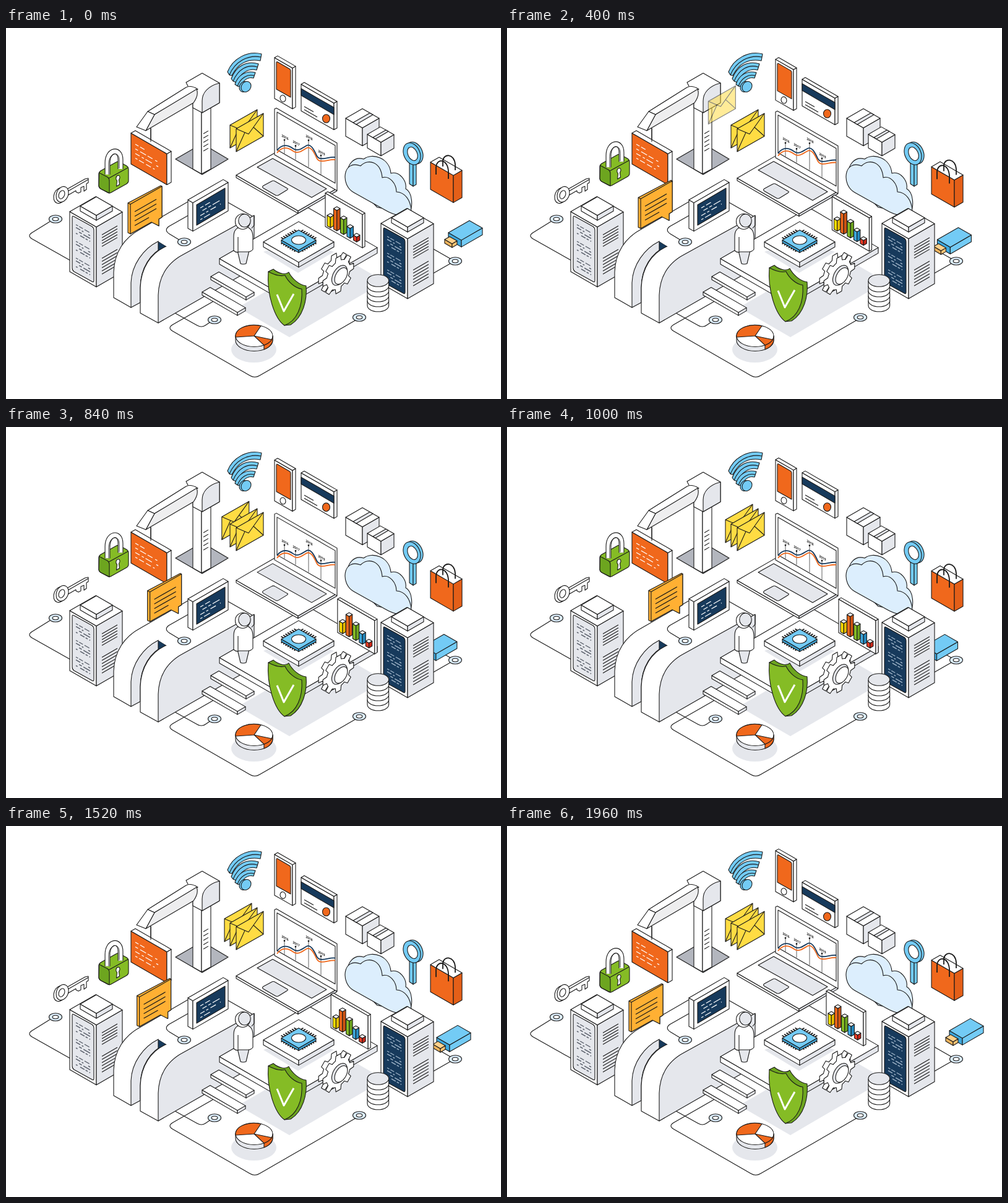
These frames come from a looping animation (800 by 600 pixels, 2000 ms). An HTML page:

```html
<!DOCTYPE html>
<html lang="en">
<head>
<meta charset="utf-8">
<title>Isometric technology scene</title>
<style>
html, body { margin: 0; width: 100%; height: 100%; overflow: hidden; background: #fff; }
svg { display: block; width: 800px; height: 600px; stroke: #1a1a1a; stroke-width: 1.1; stroke-linejoin: round; }
text { font: bold 5.5px "Open Sans", sans-serif; text-anchor: middle; fill: #1a1a1a; stroke: none; }
</style>
</head>
<body>
<svg id="stage" viewBox="0 0 800 600"></svg>
<script>
const white = '#fff', gray = '#e5e7ec', orange = '#f0681c', amber = '#ffb033', yellow = '#ffdc43',
  blue = '#73cbf5', deepBlue = '#3ea8dd', navy = '#173a5c', green = '#85bc25', darkGreen = '#6da51f', pale = '#dceefd';
const SLOPE = 0.577;

const path = (fill, d, extra = '') => `<path fill="${fill}" d="${d}" ${extra}/>`;
const line = (d, extra) => path('none', d, extra);
const flat = (fill, d) => path(fill, d, 'stroke="none"');
const oval = (fill, x, y, rx, ry, turn = 0, extra = '') =>
  `<ellipse fill="${fill}" cx="${x}" cy="${y}" rx="${rx}" ry="${ry}" transform="rotate(${turn} ${x} ${y})" ${extra}/>`;
const group = (id, ...parts) => `<g id="${id}">${parts.join('')}</g>`;

// Box from the left corner of its top: a runs down-right, b up-right, h is the height.
function prism(x, y, a, b, h, top = white, left = white, right = gray) {
  const fy = y + a * SLOPE, ry = fy - b * SLOPE, by = y - b * SLOPE;
  return path(left, `M${x},${y}L${x + a},${fy}v${h}L${x},${y + h}Z`)
    + path(right, `M${x + a},${fy}L${x + a + b},${ry}v${h}L${x + a},${fy + h}Z`)
    + path(top, `M${x},${y}L${x + a},${fy}L${x + a + b},${ry}L${x + b},${by}Z`);
}

// Parallel slanted strokes; each dash pattern makes one row.
const rows = (x, y, dx, gap, dir, color, dashes, width = 1.1) => dashes.map((dash, i) =>
  line(`M${x},${y + i * gap}l${dx},${dx * SLOPE * dir}`,
    `stroke="${color}" stroke-width="${width}" stroke-dasharray="${dash}"`)).join('');
const solid = n => Array(n).fill('none');

const node = (x, y) => oval(pale, x, y, 10.5, 6.3) + oval(white, x, y, 4.8, 2.7);

function server(dx, dy, panel, ink) {
  const code = ['4 2 7 3 9', '8 3 3 9', '0 6 5 3 10', '3 5 8 2 4'];
  const text = [0, 27, 54].map(s => rows(113, 318 + s, 23, 4.6, 1, ink, code, 1.4)).join('');
  return `<g transform="translate(${dx} ${dy})">` + prism(103, 297, 43, 42, 97)
    + path(panel, 'M107,306Q107,303 110,305L139,321Q142,323 142,327V408Q142,412 139,410L110,394Q107,392 107,388Z')
    + text + rows(155, 334.5, 25, 4.7, -1, '#1a1a1a', solid(5)) + rows(155, 372.5, 25, 5.1, -1, '#1a1a1a', solid(6))
    + prism(120, 288, 26, 26, 8) + '</g>';
}

const envelope = (x, y, id = '') => `<g id="${id}" transform="translate(${x} ${y})">`
  + path(yellow, 'M0,0L44,-25V12L0,37Z') + line('M0,0L20,8.5L44,-25M0,37L14,6M44,12L28,-2.5') + '</g>';

const ground = line('M71,313L42,331Q34,336 42,341L104,376')
  + line('M337,441L269,480Q261,485 269,490L394,562Q402,567 410,562L566,472')
  + line('M273,461L309,481Q316,485 322,481L331,475')
  + line('M690,357L718,373M718,381L690,397');

const robotArm = path('#b3b6be', 'M274,212L317,187L359,212L317,237Z')
  + path(white, 'M302,120V228L316,236V130Z') + path(white, 'M316,130V236L331,228V120Z')
  + rows(319, 171, 8, 7, -1, '#1a1a1a', solid(5))
  + path(white, 'M291,88L317,73L345,89V121L317,137L302,129V110Z')
  + path(gray, 'M317,137V118C317,105 326,94 345,89V121Z')
  + path(white, 'M229,135L291,96Q299,92 310,99L240,140Z')
  + path('#eeeeef', 'M240,140L308,99Q312,108 303,121L226,166Z')
  + path(white, 'M229,135L240,140L226,166L211,160Z') + line('M234,162V187');

const orangePanel = prism(202, 170, 58, 7, 50, white, orange, white) + line('M234,162V184')
  + rows(209, 188, 37, 7.5, 1, white, ['6 3 8 40', '5 4 11 3 9', '8 4 4 3 12', '4 3 9 4 9'], 1.3);

const wifi = path(blue, 'M358,71C366,50 390,36 413,42L411,53C390,49 374,58 365,77L361,76Z')
  + line('M361,76C370,54 391,43 412,47')
  + path(blue, 'M364,82C371,62 389,52 408,58L405,68C392,65 380,72 372,88L367,86Z') + line('M367,86C375,67 390,58 406,63')
  + path(blue, 'M370,91C375,76 388,68 403,72L400,81C392,79 384,83 379,95L374,94Z') + line('M374,94C379,81 390,74 401,77')
  + oval(blue, 385, 95, 7.5, 9, 35) + oval(blue, 388, 95, 7.5, 9, 35);

const phone = group('phone', prism(434, 40, 29, 5, 66, white, white, white),
  path(orange, 'M437,48Q437,46 439,47L458,58Q460,59 460,61V104L437,91Z'), oval(white, 447.5, 106, 4.4, 5.5, -15));

const card = group('card', prism(477, 91, 53, 5, 43, white, white, white),
  path(navy, 'M477,98L530,128.6V140L477,109Z'), line('M482,127L497,135.5M482,132L503,144'),
  oval(orange, 517.5, 146.5, 6, 6.8));

const boxes = prism(549, 146, 27, 27, 29) + path(gray, 'M561,153L588,137.4L593,140.3L566,156Z')
  + prism(584, 172, 22, 21, 22) + path(gray, 'M593,177L614,165L618,167.3L597,179.5Z');

const years = [[450, 181, 203], [468, 190.5, 213], [489, 181.5, 225], [509, 206, 237]];
const wave = 'M438,198C446,187 456,189 464,195S480,193 486,190S497,195 502,206S522,207 532,209';
const laptop = group('laptop', prism(372, 238, 100, 62.5, 4),
  path(gray, 'M406,225L431,211L518,260L494,274Z'),
  path(gray, 'M416,255L429,248Q432,246 435,248L454,259Q457,260 454,262L441,270Q438,272 435,270L416,259Q413,257 416,255Z'),
  path(white, 'M434,131L437,129.5L535,186V263L434,205Z'), path(white, 'M438,136L532,190V251L438,197Z'),
  ...years.map(([x, top, end]) => line(`M${x},${top}V${end}`, 'stroke-width=".7"')),
  line(wave, `stroke="${orange}" stroke-width="1.8" transform="translate(0 4)"`),
  line(wave, `stroke="${navy}" stroke-width="1.8"`),
  ...years.map(([x, top], i) => oval('#1a1a1a', x, top, .8, 1)
    + `<text transform="matrix(.866 .5 0 1 ${x + 1} ${top - 2.5})">${2016 + i}</text>`));

const cloud = path(pale, 'M552,240C550,220 563,207 578,212C592,201 620,210 622,235C636,231 648,247 646,260C657,266 658,288 652,300L600,290Z')
  + path(pale, 'M562,266C540,254 544,212 573,223C586,210 606,217 608,242C620,238 631,252 631,265C645,266 654,278 655,296L640,304Q625,302 612,294Z');

const lens = path(blue, 'M652,218L658,220V256L652,252Z') + path(blue, 'M658,220L663,218V253L658,256Z')
  + oval(blue, 660, 202, 13, 18.5, -24) + oval(blue, 656, 203.5, 13, 18.5, -24) + oval(white, 657, 203.5, 7.5, 11.5, -24);

const bag = group('bag', prism(686, 217, 37, 14, 44, white, orange, '#e45f18'),
  line('M706,224V215C707,202 725,203 726,221V230M695,237V225C696,210 714,211 715,232V244', 'stroke-width="1.8"'));

const usb = group('usb', prism(715, 331, 21, 34, 11, blue, deepBlue, blue),
  prism(709, 342, 12, 8, 6, '#ffd08a', '#efb45d', '#ffc474'));

const key = path(white, 'M98,261L128,244L133,243V250L130,252V261L126,264V256L121,258V265L117,267L113,265V263L101,270Z')
  + line('M100,264L133,245') + oval(white, 87, 271, 9.5, 13, 22) + oval(white, 91, 269, 9.5, 13, 22) + oval(white, 90, 269.5, 4.5, 7, 22);

const shackle = 'M164,239V220C164,198 185,195 185,215V230';
const lock = group('lock',
  path(green, 'M150,238Q150,235 153,233L178,219Q181,217 184,219L195,225Q198,227 198,230V249Q198,252 195,254L170,268Q167,270 164,268L153,262Q150,260 150,257Z'),
  path(darkGreen, 'M150.5,236L164,243Q167,245 167,249V269L153,262Q150,260 150,257Z'), line('M166,245L197,228'),
  line(shackle, 'stroke-width="9"'), line(shackle, 'stroke="#fff" stroke-width="6.8"'),
  line('M166,239V221C167,203 183,200 183,216V229', 'stroke-width=".9"'),
  path(white, 'M178,247C177,240 184,238 184,244L182.5,248L183.5,255L178.5,258L179.5,249Z'));

const arch = path(white, 'M174,436V395C175,362 192,339 216,326L325,263L401,306L260,372L202,452Z')
  + path(gray, 'M202,452V412C203,383 222,357 246,345L259,353C233,362 217,390 217,420V444Z')
  + path(navy, 'M246,345L259,353L246,363Z')
  + path(white, 'M217,461V420C218,388 234,364 259,353L330,300L401,306L290,368L246,477Z')
  + flat(white, 'M259,353L246,345L325,290L400,306L290,368Z')
  + path(gray, 'M246,477V432C247,400 262,379 287,366L401,303V388Z')
  + line('M279,342L264,333Q255,327 263,321L300,300');

const screen = prism(294, 278, 8, 57, 46, white, white, white) + path(navy, 'M308,286L354,259V292L308,319Z')
  + rows(314, 291, 33, 6.3, -1, white, ['6 3 9 60', '0 4 8 3 5 3 9', '8 3 4 4 10', '4 3 11 40'], 1.2);

const bubble = group('bubble', path(amber, 'M197,283L250,255L252,256V306L247,309V320L235,313L201,333L197,331Z'),
  path(amber, 'M201,285L252,256V306L247,309V320L235,314L201,333Z'), line('M197,283L201,285'),
  line('M208,297L243,277M208,304.5L243,284.5M208,312L243,292M208,319.5L231,306.5', 'stroke-width="1.3"'));

const platform = flat(gray, 'M375,452L458,500L612,410L560,380L472,396Z') + prism(345, 373, 112, 143, 9);

let pins = '';
for (let i = 1; i < 8; i++) {
  const s = i * 3.5, d = s * SLOPE;
  pins += `M${445 + s},${345 + d}l-4,2.3M${473 + s},${361 - d}l4,2.3M${445 + s},${343 - d}l-4,-2.3M${473 + s},${327 + d}l4,-2.3`;
}
const chip = flat(gray, 'M416,362L472,396L530,362L472,340Z') + prism(416, 346, 57, 57, 8) + line(pins, 'stroke-width="1.8"')
  + prism(445, 343, 28, 28, 4, blue, deepBlue, deepBlue) + oval(white, 473, 343, 11.5, 7);

const bars = [[519, 303, 17, '#ffdd00', '#e8bd00'], [529.5, 292, 33, orange, '#cf5412'], [540.5, 307, 24, green, darkGreen],
  [551, 321, 16, deepBlue, '#258ac0'], [561.5, 335, 8, '#ee3b24', '#c92718']];
const chart = group('chart', prism(516, 267, 60, 4, 54, white, white, white),
  ...bars.map(([x, y, h, front, side]) => prism(x, y, 5.2, 5.2, h, white, front, side)));

const person = path(gray, 'M374,360H393L388,381Q383,383 379,381Z')
  + path(white, 'M368,360V337C368,326 374,321 385,321C396,322 399,330 399,338V358Q396,362 391,362H377Q372,364 368,360Z')
  + line('M375,362V338M397,324L401,319V303')
  + oval(white, 382.5, 313, 12, 12.5) + oval(gray, 385.5, 311.5, 9.8, 10.5);

const stairs = prism(331, 402, 57, 13, 5) + prism(317, 427, 57, 13, 5);

// Closed shape in the plane facing right, from [angle, radius] pairs around a centre.
function wheel(fill, cx, cy, points) {
  const spots = points.map(([a, r]) => {
    const x = Math.cos(a) * r * .866;
    return `${(cx + x).toFixed(1)},${(cy + Math.sin(a) * r - x * SLOPE).toFixed(1)}`;
  });
  return path(fill, `M${spots.join('L')}Z`);
}
const TEETH = 8, STEP = Math.PI * 2 / TEETH;
const cog = Array.from({ length: TEETH }, (_, i) =>
  [[-.32, 22], [-.2, 29], [.2, 29], [.32, 22], [.5, 22]].map(([part, r]) => [(i + part) * STEP, r])).flat();
const ring = r => Array.from({ length: 40 }, (_, i) => [i * Math.PI / 20, r]);
const gear = wheel(white, 530, 395, cog) + wheel(white, 537, 399, cog)
  + wheel(gray, 539, 400, ring(14.5)) + wheel(white, 541.5, 401, ring(12));

const shield = group('shield',
  path(darkGreen, 'M424,394L432,390C440,397 452,400 457,395C462,405 474,416 485,417C487,440 480,468 460,480L450,481Z'),
  path(green, 'M424,394C433,399 443,402 451,400C456,411 468,421 478,422C480,450 470,474 450,481C434,470 421,430 424,394Z'),
  line('M438,431L449,458L465,430', 'stroke="#fff" stroke-width="3"'));

let coins = '';
for (let y = 449; y > 410; y -= 8) coins += path(white, `M584,${y - 8}V${y}A17.3,9.8 0 0 0 618.6,${y}V${y - 8}`);
coins += oval(gray, 601.3, 408.5, 17.3, 9.8);

const pie = oval(gray, 400.5, 520, 36.5, 21, 0, 'stroke="none"')
  + path(gray, 'M371,498V505A30,17.5 0 0 0 431,505V498Z')
  + path(orange, 'M417,513V520Q430,515 431,505V498Z') + oval(white, 401, 498, 30, 17.5)
  + path(orange, 'M401,498L371,500A30,17.5 0 0 1 412,481.8Z') + path(orange, 'M401,498L429.5,504A30,17.5 0 0 1 417,513Z');

const stage = document.getElementById('stage');
stage.innerHTML = [ground, robotArm, orangePanel, wifi, phone, card, boxes,
  envelope(353, 150, 'mail'), envelope(362, 157), envelope(372, 163), cloud, lens, bag, key, lock,
  server(0, 0, gray, '#555b66'), arch, node(288, 346), screen, bubble, platform, chip, laptop, chart, person,
  node(726, 377), usb, server(503, 19, navy, '#9fb4c8'), node(80, 309), node(337, 472), node(571, 468),
  stairs, gear, shield, coins, pie].join('');

const LOOP = 2000, PEAK = 920, REST = 1960, FADE = 740;
const part = Object.fromEntries([...stage.querySelectorAll('g[id]')].map(g => [g.id, g]));
const move = (id, x, y) => part[id].setAttribute('transform', `translate(${x} ${y})`);

function draw(t) {
  const rising = t < PEAK;
  const u = rising ? t / PEAK : Math.max(0, (REST - t) / (REST - PEAK));
  move('bubble', 34.6 * u, -20 * u);
  move('usb', -45 * u, 26 * u);
  move('chart', 21.7 * u, 12.4 * u);
  move('laptop', 0, 10.8 * u);
  move('card', 0, -18.4 * u);
  move('bag', 0, 17 * u);
  move('shield', 0, -14.3 * u);
  move('phone', 0, rising ? 8 + 6 * u : 14 * u);
  move('lock', 0, rising ? -2 - 27 * u : -29 * u);
  const left = Math.max(0, 1 - t / PEAK);
  move('mail', 353 - 49 * left, 150 - 56 * left);
  part.mail.setAttribute('opacity', Math.min(1, t / FADE));
}

const start = performance.now();
function tick(now) {
  draw(Math.max(0, now - start) % LOOP);
  requestAnimationFrame(tick);
}
draw(0);
requestAnimationFrame(tick);
</script>
</body>
</html>
```
